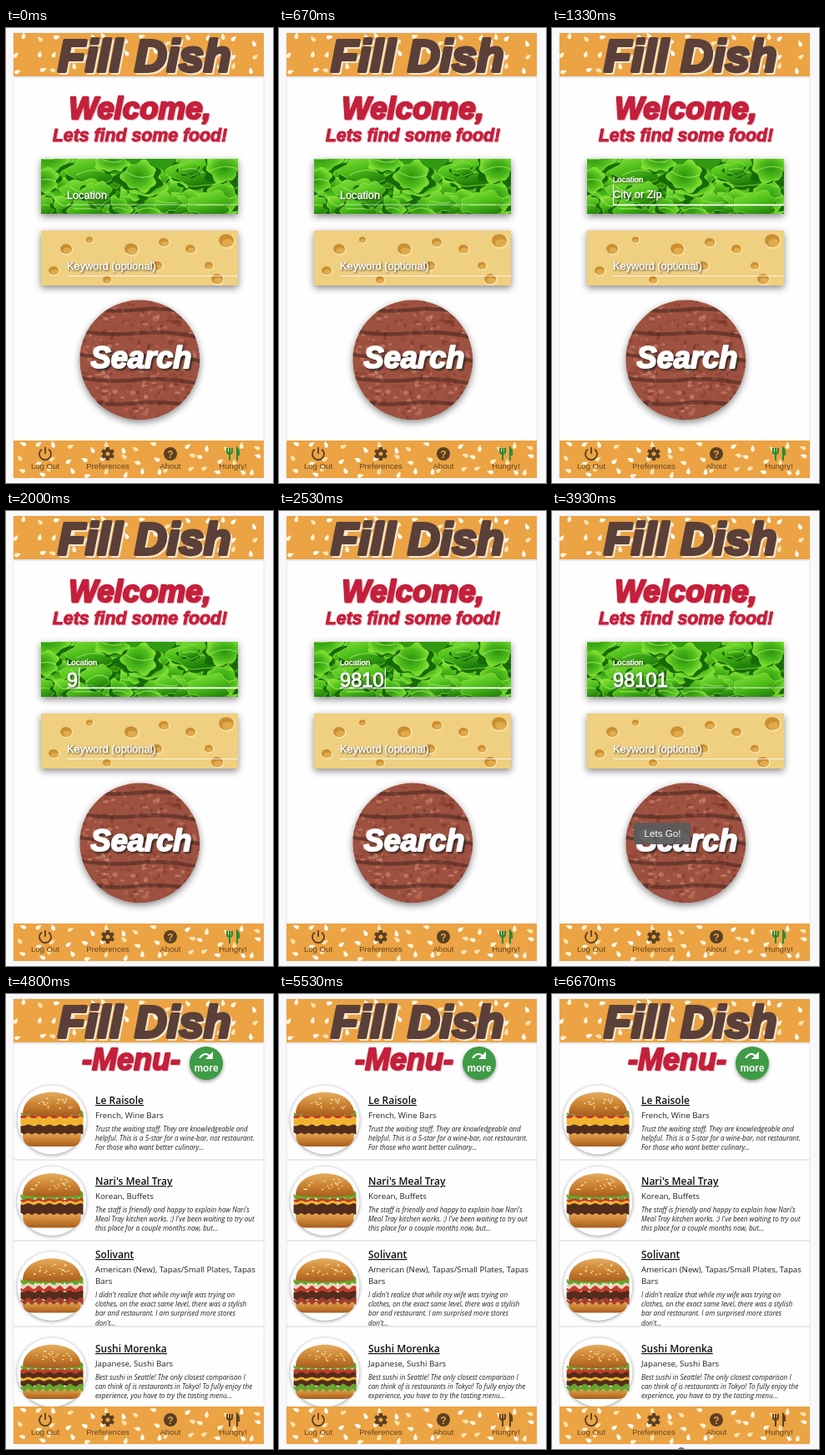
These frames come from a looping animation (320 px wide and 546 px high, 6.74 s). An HTML page:

```html
<!DOCTYPE html>
<html lang="en">
<head>
<meta charset="utf-8">
<title>Food finder</title>
<style>
  html, body { margin: 0; width: 100%; height: 100%; overflow: hidden; background: #f9f8fa; }
  body > svg { display: block; width: 100%; height: 100%; }
  text { font-family: "Liberation Sans", Arial, sans-serif; }
  .script { font-weight: bold; font-style: italic; text-anchor: middle; paint-order: stroke; stroke-linejoin: round; }
  .field text { fill: #fff; stroke: #fff; stroke-width: .4; filter: drop-shadow(1px 1px 1px #000a); }
  .card { filter: drop-shadow(0 3px 4px #0007); }
  .soft { filter: blur(.7px); }
  .tab { font-size: 9.6px; text-anchor: middle; fill: #65471f; }
  .place text { font-family: "Open Sans", sans-serif; fill: #222; }
  .place .name { font-size: 12px; font-weight: 600; text-decoration: underline; fill: #111; }
  .place .kind { font-size: 9.75px; }
  .place .review { font-size: 8.15px; font-style: italic; }
</style>
</head>
<body>
<script>
const LOOP = 6740, FOCUS = 1050, FLOAT = 200, BLUR = 3650, MENU = 4400;
const KEYS = [1930, 2130, 2270, 2470, 2670], ZIP = "98101";

let seed = 7;
const rand = (a = 0, b = 1) => {
  seed = (seed * 16807) % 2147483647;
  return a + (b - a) * seed / 2147483647;
};
const pick = list => list[Math.floor(rand(0, list.length))];
const repeat = (n, make) => Array.from({ length: n }, (_, i) => make(i)).join("");
const ellipse = (x, y, rx, ry, fill, more = "") =>
  `<ellipse cx="${x}" cy="${y}" rx="${rx}" ry="${ry}" fill="${fill}" ${more}/>`;
const rect = (x, y, w, h, fill, more = "") =>
  `<rect x="${x}" y="${y}" width="${w}" height="${h}" fill="${fill}" ${more}/>`;
const path = (d, fill, more = "") => `<path d="${d}" fill="${fill}" ${more}/>`;
const label = (x, y, text, more = "") => `<text x="${x}" y="${y}" ${more}>${text}</text>`;
const script = (x, y, text, size, color, weight, shadow) =>
  label(x, y, text, `class="script" font-size="${size}" fill="${color}" stroke="${color}"
    stroke-width="${weight}" style="filter:drop-shadow(${shadow})"`);
const clip = (id, content) => `<g clip-path="url(#${id})">${content}</g>`;
const card = (id, content) => `<g class="card">${clip(id, content)}</g>`;

// Orange bun strip sprinkled with sesame seeds
function bunStrip(id, y, h) {
  const columns = 15, rows = 3;
  const seeds = repeat(columns * rows, i => {
    const x = 18 + (i % columns) * 20 + rand(-7, 7);
    const sy = y + 8 + Math.floor(i / columns) * (h / rows) + rand(-5, 5);
    return path("M0-5Q4 1 2 3Q0 5-2 3Q-4 1 0-5Z", pick(["#fff4d8", "#fde3ad", "#fffaf0"]),
      `transform="translate(${x} ${sy}) rotate(${rand(-80, 80)}) scale(.9)"`);
  });
  return clip(id, rect(9, y, 300, h, "#eba344") + seeds);
}

function ruffle(x, y, r, fill, stroke) {
  const phase = rand(0, 6), lobes = Math.round(rand(5, 8)), tilt = rand(1.1, 1.7);
  const points = Array.from({ length: 49 }, (_, i) => {
    const a = i / 48 * Math.PI * 2;
    const d = r * (1 + .1 * Math.sin(lobes * a + phase) + .12 * Math.sin(3 * a + phase));
    return `${(x + tilt * d * Math.cos(a)).toFixed(1)} ${(y + d * Math.sin(a)).toFixed(1)}`;
  });
  return path(`M${points.join("L")}Z`, fill, `stroke="${stroke}" stroke-width=".8"`);
}

function lettuce() {
  const leaves = repeat(46, i => {
    const x = 38 + (i * 67 % 245) + rand(-8, 8), y = rand(155, 226), r = rand(8, 19);
    const bend = rand(-9, 9);
    return ruffle(x, y + 2, r, "#176a08", "none") +
      ruffle(x, y, r, pick(["url(#leaf)", "url(#fold)"]), "#8fe23c") +
      path(`M${x - r} ${y + bend}Q${x} ${y - bend} ${x + r} ${y + bend / 3}`, "none",
        `stroke="#b4ee70" stroke-width="1.4" opacity=".6"`);
  });
  return rect(42, 157, 236, 66, "#309b10") + `<g class="soft">${leaves}</g>`;
}

function cheese() {
  const holes = [[72, 265, 7], [100, 254, 4], [150, 265, 8], [189, 257, 6], [221, 265, 6], [264, 255, 9],
    [57, 291, 6], [181, 285, 6], [243, 285, 5], [121, 302, 5], [253, 301, 7]];
  return rect(42, 243, 236, 66, "#efcf80") + `<g class="soft">` + holes.map(([x, y, r]) =>
    ellipse(x + 1, y + 1, r + 1, r, "#f8e0a0") + ellipse(x, y, r, r * .85, "#cb8f2f") +
    ellipse(x + r * .2, y + r * .3, r * .75, r * .5, "#e0ab4c")).join("") + "</g>";
}

function patty() {
  const crumbs = repeat(420, () => ellipse(rand(88, 233), rand(326, 471), rand(1, 4), rand(1, 3),
    pick(["#c0705a", "#ad5843", "#7a3528", "#cb8a73", "#8f4333"]), `opacity=".6"`));
  const grill = repeat(5, i => {
    const y = 335 + i * 28;
    return path(`M84 ${y}Q125 ${y + 7} 160 ${y + 3}T238 ${y + 10}`, "none",
      `stroke="#3a211b" stroke-width="4.5" opacity=".5"`);
  });
  return ellipse(160.3, 398.3, 72, 72, "#9d5140") + `<g class="soft">${crumbs}${grill}</g>`;
}

// Layers are stacked downwards as [colour, thickness, wave height]
function burger(cy, layers) {
  let y = cy - 9;
  const slab = ([color, h, wave]) => {
    const xs = Array.from({ length: 38 }, (_, i) => i * 2 - 37);
    const edge = (x, base, k) => `${55 + x} ${(base + wave * Math.sin(x * k)).toFixed(1)}`;
    const d = `M${xs.map(x => edge(x, y, .5)).join("L")}L${xs.reverse().map(x => edge(x, y + h, .72)).join("L")}Z`;
    y += h;
    return path(d, color, `stroke="${color}" stroke-linejoin="round"`);
  };
  const filling = layers.map(slab).join("");
  const sesame = repeat(22, () => {
    const a = rand(-1, 1), b = rand(.15, .85);
    return ellipse(55 + a * 28 * (1 - b * .4), cy - 11 - b * 18, 1.2, .7, "#fae4b0");
  });
  return ellipse(55, cy, 41.5, 41.5, "#fff", `style="filter:drop-shadow(0 1px 2px #0006)"`) +
    path(`M20 ${y - 2}H90Q91 ${cy + 32} 78 ${cy + 32}H32Q19 ${cy + 32} 20 ${y - 2}Z`, "url(#bun)") + filling +
    path(`M20 ${cy - 7}C20 ${cy - 42} 90 ${cy - 42} 90 ${cy - 7}Q55 ${cy - 3} 20 ${cy - 7}Z`, "url(#bun)") + sesame;
}

const GREEN = "#65a62a", RED = "#c63b26", BROWN = "#542c1c", YELLOW = "#f0b42c", PALE = "#e9d6c4";
const places = [
  { top: 100, circle: 151, name: "Le Raisole", kind: ["French, Wine Bars"],
    review: ["Trust the waiting staff. They are knowledgeable and",
      "helpful. This is a 5-star for a wine-bar, not restaurant.", "For those who want better culinary..."],
    layers: [[GREEN, 4, 2], [RED, 3, 0], [YELLOW, 9, 2], [BROWN, 9, 1]] },
  { top: 197, circle: 248.5, name: "Nari's Meal Tray", kind: ["Korean, Buffets"],
    review: ["The staff is friendly and happy to explain how Nari's",
      "Meal Tray kitchen works. :) I've been waiting to try out", "this place for a couple months now, but..."],
    layers: [[GREEN, 7, 3], [RED, 3, 1], [YELLOW, 3, 1], [BROWN, 11, 1]] },
  { top: 285, circle: 350.5, name: "Solivant", kind: ["American (New), Tapas/Small Plates, Tapas", "Bars"],
    review: ["I didn't realize that while my wife was trying on", "clothes, on the exact same level, there was a stylish",
      "bar and restaurant. I am surprised more stores", "don't..."],
    layers: [[GREEN, 7, 3], [PALE, 4, 1], [RED, 5, 2], [BROWN, 9, 1], ["#a53c2c", 4, 2]] },
  { top: 398, circle: 454, name: "Sushi Morenka", kind: ["Japanese, Sushi Bars"],
    review: ["Best sushi in Seattle! The only closest comparison I",
      "can think of is restaurants in Tokyo! To fully enjoy the", "experience, you have to try the tasting menu..."],
    layers: [[GREEN, 6, 3], [RED, 4, 0], [BROWN, 6, 1], [YELLOW, 3, 1], [BROWN, 6, 1], [GREEN, 5, 2]] }
];

function listing(p) {
  const kindEnd = p.top + 49 + (p.kind.length - 1) * 14;
  return `<g class="place">` + burger(p.circle, p.layers) + label(107, p.top + 32, p.name, `class="name"`) +
    p.kind.map((s, i) => label(107, p.top + 49 + i * 14, s, `class="kind"`)).join("") +
    p.review.map((s, i) => label(107, kindEnd + 16 + i * 11.2, s, `class="review"`)).join("") + "</g>";
}

const home = `
  ${script(160.5, 109, "Welcome,", 36.7, "#c4203b", 2.4, "1px 1px 0 #f0c3ca")}
  ${script(160.5, 136, "Lets find some food!", 21.3, "#c4203b", 1, "1px 1px 0 #f0c3ca")}
  ${card("lettuce", lettuce())}${card("cheese", cheese())}
  <g class="field">
    ${rect(73, 211.5, 205, 1, "#fff", `id="line"`)}${rect(73, 297, 205, 1, "#fff", `opacity=".75"`)}
    ${label(73, 205, "Location", `id="location"`)}
    ${label(73, 204, "City or Zip", `id="hint" font-size="12.9"`)}
    ${label(73, 210.5, "", `id="zip" font-size="23.7" style="stroke-width:1"`)}
    ${rect(73, 188, 1, 24, "#fff", `id="caret"`)}
    ${label(73, 290, "Keyword (optional)", `font-size="12.8"`)}
  </g>
  ${card("patty", patty())}
  ${script(162, 408, "Search", 36.3, "#fff", 2, "2px 2px 1px #222c")}
  <g id="tooltip">${rect(98, 374, 68, 26, "#5b5b5b", `rx="2" opacity=".94"`)}
    ${label(132.5, 391, "Lets Go!", `font-size="11.6" fill="#fff" text-anchor="middle"`)}</g>`;

const menu = `
  ${script(150, 91, "-Menu-", 36, "#c4203b", 2, "1px 1px 0 #f0c3ca")}
  ${ellipse(240, 83, 20, 20, "#3f9b45", `style="filter:drop-shadow(0 2px 2px #0006)"`)}
  ${path("M232 77Q237 69 244 74", "none", `stroke="#fff" stroke-width="2"`)}${path("M248 69V78H239Z", "#fff")}
  ${label(240, 93, "more", `font-size="11.9" font-weight="bold" text-anchor="middle" fill="#fff"`)}
  ${[199, 296, 399].map(y => rect(9, y - .5, 300, 1, "#d6d6d6")).join("")}
  ${places.map(listing).join("")}`;

const INK = "#5a4022";
const tabs = `
  ${path("M43 505.5A7 7 0 1 0 51 505.5M47 503V511", "none", `stroke="${INK}" stroke-width="1.8"`)}
  <g transform="translate(122 511)">${repeat(6, i => rect(-2, -8, 4, 5, INK, `transform="rotate(${i * 60})"`))}
    <circle r="4.3" fill="none" stroke="${INK}" stroke-width="3.4"/></g>
  ${ellipse(197, 511, 8, 8, INK)}${label(197, 515.5, "?", `font-size="12" font-weight="bold" fill="#eba344" text-anchor="middle"`)}
  <g id="cutlery">${path("M265 504V508Q265 511 268 511Q271 511 271 508V504M268 504V519M277 519V504Q280 507 279 512H277", "none",
    `stroke="currentColor" stroke-width="2"`)}</g>
  ${["Log Out", "Preferences", "About", "Hungry!"].map((s, i) => label(47 + i * 75, 529, s, `class="tab"`)).join("")}`;

const clipBox = (id, ...box) => `<clipPath id="${id}">${rect(...box, "#000")}</clipPath>`;

document.body.innerHTML = `<svg viewBox="0 0 320 546">
  <defs>
    <radialGradient id="leaf"><stop stop-color="#2c950d"/><stop offset=".6" stop-color="#4dbb1c"/><stop offset="1" stop-color="#7fdf32"/></radialGradient>
    <linearGradient id="fold" x2=".4" y2="1"><stop stop-color="#92e445"/><stop offset=".5" stop-color="#50c21b"/><stop offset="1" stop-color="#1f7d0a"/></linearGradient>
    <linearGradient id="bun" x2="0" y2="1"><stop stop-color="#e5ad60"/><stop offset=".55" stop-color="#c9802f"/><stop offset="1" stop-color="#a65d20"/></linearGradient>
    <clipPath id="patty"><circle cx="160.3" cy="398.3" r="72"/></clipPath>
    ${clipBox("lettuce", 42, 157, 236, 66)}${clipBox("cheese", 42, 243, 236, 66)}
    ${clipBox("header", 9, 6, 300, 52)}${clipBox("footer", 9, 495, 300, 45)}${clipBox("page", 9, 6, 301, 535)}
  </defs>
  ${rect(0, 0, 320, 546, "#f9f8fa")}
  ${rect(9, 6, 300, 534, "#fefefe", `stroke="#e6e5e9"`)}
  ${rect(9, 58, 300, 2, "#e8e8e8")}
  ${bunStrip("header", 6, 52)}
  ${script(166, 52, "Fill Dish", 53.3, "#5a4039", 4, "2px 2px 0 #f9e5c9")}
  <g id="home">${home}</g>
  <g id="menu">${clip("page", menu)}</g>
  ${bunStrip("footer", 495, 45)}${tabs}
  ${path("M0 0V15L3.5 12L6 18L8.5 17L6 11H11Z", "#111", `id="pointer" stroke="#fff"`)}
  <g id="dot">${ellipse(155, 549, 5, 5, "#777")}</g>
</svg>`;

const el = id => document.getElementById(id);
const set = (id, attrs) => Object.entries(attrs).forEach(([k, v]) => el(id).setAttribute(k, v));
const show = (id, on) => set(id, { visibility: on ? "visible" : "hidden" });
const progress = (t, start, length) => Math.min(1, Math.max(0, (t - start) / length));
const ease = p => p * p * (3 - 2 * p);
const mix = (a, b, p) => a + (b - a) * p;

function draw(t) {
  const onMenu = t >= MENU, focused = t >= FOCUS && t < BLUR;
  set("home", { display: onMenu ? "none" : "inline" });
  set("menu", { display: onMenu ? "inline" : "none" });
  set("cutlery", { color: onMenu ? INK : "#218a3b" });

  const lift = ease(progress(t, FOCUS, FLOAT));
  set("location", { y: mix(205, 185, lift), "font-size": mix(12.7, 9.6, lift) });
  set("line", { height: focused ? 1.7 : 1, opacity: focused ? 1 : .6 });

  const typed = KEYS.filter(k => t >= k).length;
  set("hint", { opacity: typed ? 0 : lift });
  el("zip").textContent = ZIP.slice(0, typed);
  const lastKey = typed ? KEYS[typed - 1] : FOCUS;
  set("caret", { x: 73 + typed * 13.2 + (typed ? 1 : 0) });
  show("caret", focused && (t - lastKey) % 1000 < 500);

  const enter = ease(progress(t, 3000, 200)), press = ease(progress(t, 3250, 300));
  set("pointer", { transform: `translate(${mix(mix(318, 178, enter), 132, press)} ${mix(mix(340, 357, enter), 390, press)})` });
  show("pointer", t >= 3000 && t < BLUR);
  set("tooltip", { opacity: progress(t, 3600, 150) });
  show("dot", t >= 6640);
}

function tick(now) {
  draw(now % LOOP);
  requestAnimationFrame(tick);
}
draw(0);
requestAnimationFrame(tick);
</script>
</body>
</html>
```
